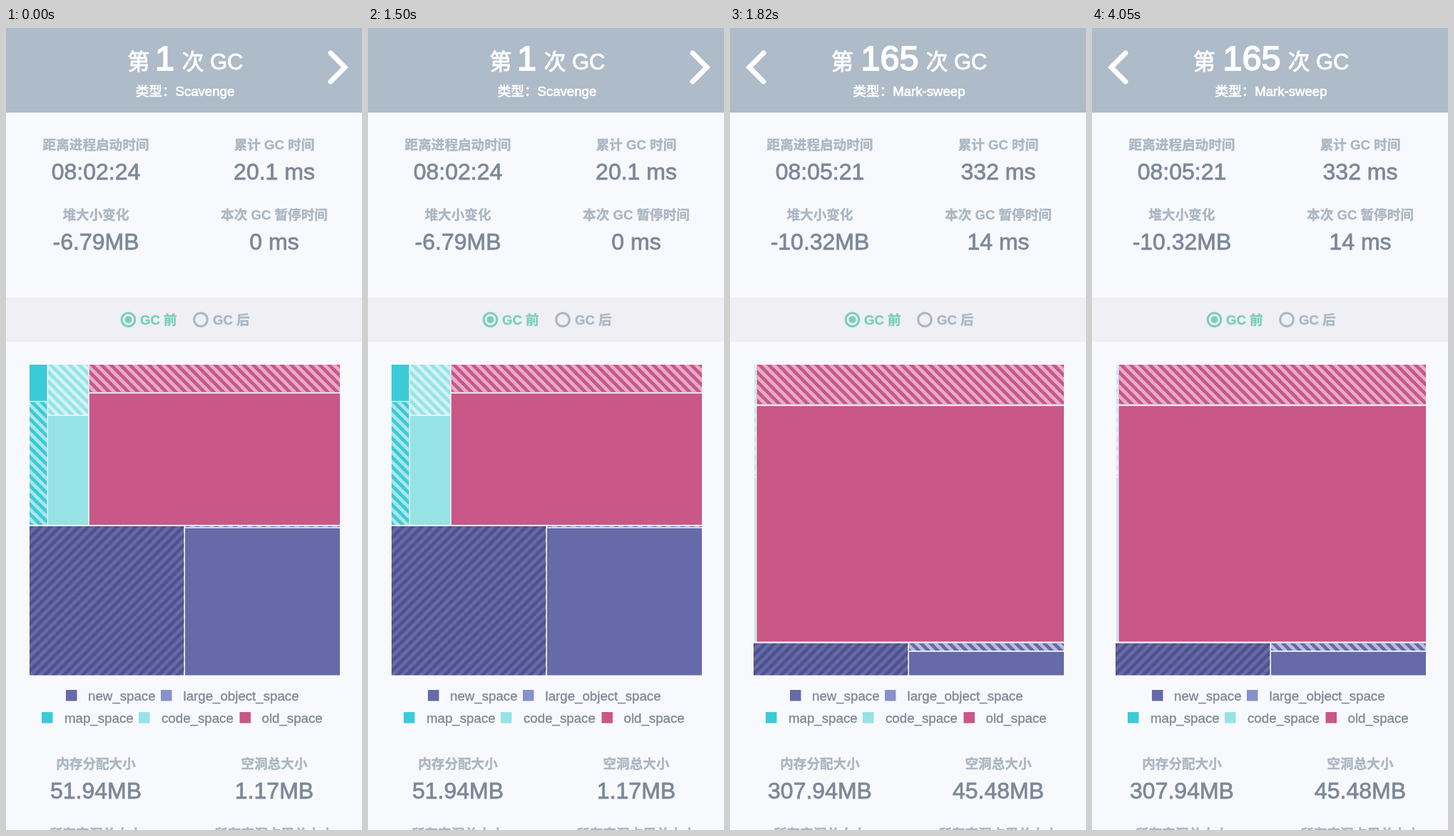
Write an HTML page with a canvas that moves like this. It is 499 px wide and 1122 px high and loops after 4100 ms.

```html
<!DOCTYPE html>
<html lang="zh-CN">
<head>
<meta charset="utf-8">
<title>GC</title>
<style>
html, body { margin: 0; width: 100%; height: 100%; overflow: hidden; background: #f8f9fd; }
#stage { position: absolute; left: 0; top: 0; width: 499px; height: 1122px; overflow: hidden; }
svg, canvas { position: absolute; left: 0; top: 0; display: block; }
text { font-family: "Liberation Sans", "Noto Sans CJK SC", "Noto Sans CJK", sans-serif; }
.mid { text-anchor: middle; }
.label { font-size: 18.6px; font-weight: 700; fill: #abb7c3; stroke: #abb7c3; stroke-width: .4; }
.label.on { fill: #7acfb9; stroke: #7acfb9; }
.value { font-size: 32px; fill: #7d8899; stroke: #7d8899; stroke-width: .8; }
.legend { font-size: 18.7px; fill: #808a98; stroke: #808a98; stroke-width: .4; }
.head { fill: #fff; stroke: #fff; stroke-width: .9; font-weight: 500; font-size: 31px; }
.head .count { font-size: 48.6px; stroke-width: 1.8; }
.head .type { font-size: 18.6px; stroke-width: .7; }
.arrow { fill: none; stroke: #fff; stroke-width: 7; stroke-linecap: round; }
</style>
</head>
<body>
<div id="stage">
<svg width="499" height="1122" viewBox="0 0 499 1122">
  <rect width="499" height="118.4" fill="#aebbc8"/>
  <rect y="377" width="499" height="62" fill="#efeff4"/>

  <g fill="none" stroke-width="3">
    <circle cx="171.5" cy="408" r="9.3" stroke="#7acfb9"/>
    <circle cx="273" cy="408" r="9.3" stroke="#abb7c3"/>
  </g>
  <circle cx="171.5" cy="408" r="5" fill="#7acfb9"/>
  <text class="label on" x="188" y="415">GC 前</text>
  <text class="label" x="290" y="415">GC 后</text>

  <g class="label mid">
    <text x="126" y="169.5">距离进程启动时间</text>
    <text x="376" y="169.5">累计 GC 时间</text>
    <text x="126" y="267.5">堆大小变化</text>
    <text x="376" y="267.5">本次 GC 暂停时间</text>
    <text x="126" y="1035.5">内存分配大小</text>
    <text x="376" y="1035.5">空洞总大小</text>
    <text x="126" y="1133.5">所有空洞总大小</text>
    <text x="376" y="1133.5">所有空洞占用总大小</text>
  </g>

  <g id="legend" class="legend"></g>

  <g id="before">
    <path class="arrow" d="M455 35L475 55L455 75"/>
    <g class="head">
      <text x="170.5" y="58">第</text>
      <text class="count" x="209" y="59">1</text>
      <text x="246.5" y="58">次</text>
      <text x="286" y="58">GC</text>
      <text class="type mid" x="251" y="95">类型：Scavenge</text>
    </g>
  </g>
  <g id="after" visibility="hidden">
    <path class="arrow" d="M47 35L27 55L47 75"/>
    <g class="head">
      <text x="142" y="58">第</text>
      <text class="count" x="183.5" y="59">165</text>
      <text x="274.5" y="58">次</text>
      <text x="314" y="58">GC</text>
      <text class="type mid" x="251" y="95">类型：Mark-sweep</text>
    </g>
  </g>
</svg>
<canvas id="tree" width="499" height="1122"></canvas>
</div>
<script>
const LOOP = 4100, SWITCH = 1590, GROW = 230, PERIOD = 13.3;
const $ = id => document.getElementById(id);
const ctx = $('tree').getContext('2d');

function addText(parent, cls, x, y, str) {
  const t = document.createElementNS('http://www.w3.org/2000/svg', 'text');
  t.setAttribute('class', cls);
  t.setAttribute('x', x);
  t.setAttribute('y', y);
  t.textContent = str;
  parent.appendChild(t);
}

// Readings shown before and after the switch: centre x, baseline, then both values
[
  [126, 212, '08:02:24', '08:05:21'],
  [376, 212, '20.1 ms', '332 ms'],
  [126, 310, '-6.79MB', '-10.32MB'],
  [376, 310, '0 ms', '14 ms'],
  [126, 1078, '51.94MB', '307.94MB'],
  [376, 1078, '1.17MB', '45.48MB']
].forEach(([x, y, a, b]) => {
  addText($('before'), 'value mid', x, y, a);
  addText($('after'), 'value mid', x, y, b);
});

const BLUE = '#666aa8', TEAL = '#3bcbd7', AQUA = '#96e3e5', PINK = '#c95788';

[
  [84, 926, BLUE, 115, 'new_space'],
  [217, 926, '#8991cb', 248.5, 'large_object_space'],
  [50, 957, TEAL, 82, 'map_space'],
  [186, 957, AQUA, 218, 'code_space'],
  [327.5, 957, PINK, 358.5, 'old_space']
].forEach(([x, y, color, tx, name]) => {
  const r = document.createElementNS('http://www.w3.org/2000/svg', 'rect');
  Object.entries({ x, y, width: 15.5, height: 15.5, fill: color, stroke: 'none' })
    .forEach(([k, v]) => r.setAttribute(k, v));
  $('legend').appendChild(r);
  addText($('legend'), '', tx, y + 15, name);
});

// Each cell: left, top, right, bottom at the start and at the end
const cells = [
  { from: [33, 471, 57.5, 521.8], to: [33, 471, 33, 568], fill: TEAL },
  { from: [33, 523.2, 57.5, 695], to: [33, 569.5, 33, 858.5], fill: TEAL, stripe: '#a9e6ec' },
  { from: [59, 471, 115.3, 541], to: [34.5, 471, 36, 627], fill: AQUA, stripe: '#d2f2f4' },
  { from: [59, 542.5, 115.3, 695], to: [34.5, 628.5, 36, 858.5], fill: AQUA },
  { from: [116.8, 471, 468, 509.5], to: [37.5, 471, 468, 526.5], fill: PINK, stripe: '#e7acc9' },
  { from: [116.8, 511.3, 468, 695], to: [37.5, 528.8, 468, 858.5], fill: PINK },
  { from: [33, 697, 249.3, 905.5], to: [33, 860.7, 249.3, 905.5], fill: BLUE, stripe: '#50538b', rising: true },
  { from: [251, 697, 468, 698.3], to: [251, 860.7, 468, 871], fill: BLUE, stripe: '#b9bcdb' },
  { from: [251, 699.8, 468, 905.5], to: [251, 872.7, 468, 905.5], fill: BLUE }
];

function drawCell({ from, to, fill, stripe, rising }, p) {
  const [l, t, r, b] = from.map((v, i) => v + (to[i] - v) * p);
  const w = r - l, h = b - t;
  if (w <= 0) return;
  ctx.save();
  ctx.translate(l, t);
  ctx.fillStyle = fill;
  ctx.fillRect(0, 0, w, h);
  if (stripe) {
    ctx.beginPath();
    ctx.rect(0, 0, w, h);
    ctx.clip();
    ctx.beginPath();
    const half = PERIOD / 2, slant = rising ? -h : h;
    const first = rising ? 0 : -half - Math.ceil(h / PERIOD) * PERIOD;
    const last = rising ? w + h : w;
    for (let x = first; x < last; x += PERIOD) {
      ctx.moveTo(x, 0);
      ctx.lineTo(x + half, 0);
      ctx.lineTo(x + half + slant, h);
      ctx.lineTo(x + slant, h);
      ctx.closePath();
    }
    ctx.fillStyle = stripe;
    ctx.fill();
  }
  ctx.restore();
}

function render() {
  const t = performance.now() % LOOP;
  const switched = t >= SWITCH;
  $('before').setAttribute('visibility', switched ? 'hidden' : 'visible');
  $('after').setAttribute('visibility', switched ? 'visible' : 'hidden');
  const k = Math.min(1, Math.max(0, (t - SWITCH) / GROW));
  const p = 1 - (1 - k) ** 5;
  ctx.clearRect(0, 0, 499, 1122);
  cells.forEach(c => drawCell(c, p));
  requestAnimationFrame(render);
}
render();
</script>
</body>
</html>
```
